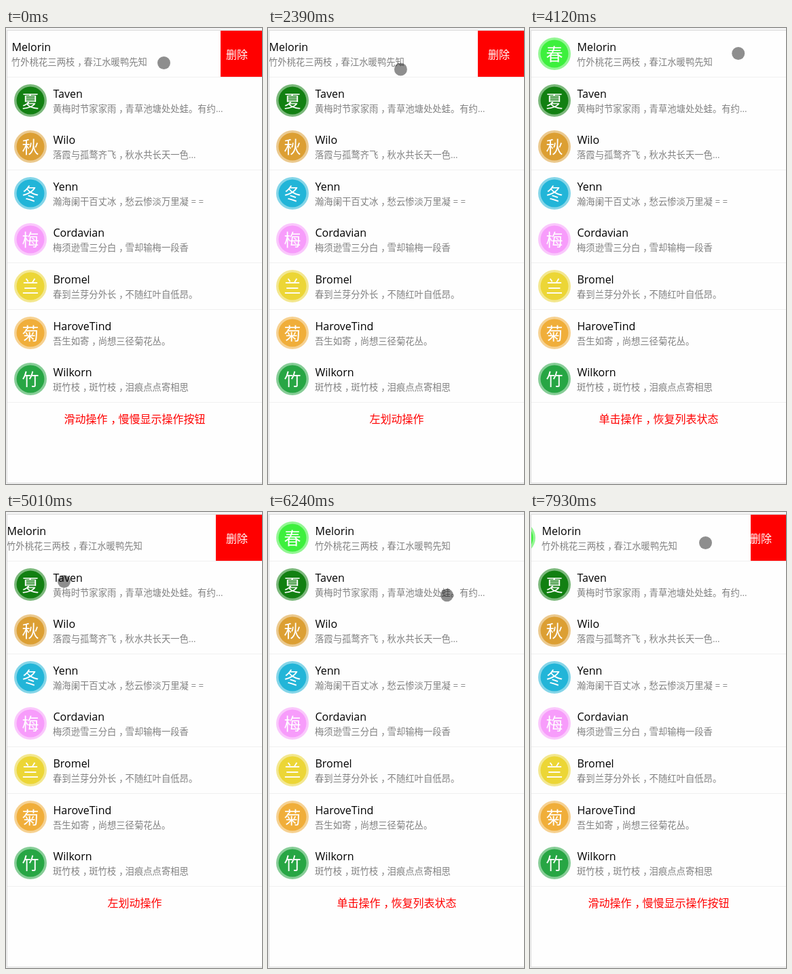
An HTML page with a canvas that plays this animation: 377 by 673 pixels, repeating every 8 s.

```html
<!DOCTYPE html>
<html lang="zh-CN">
<head>
<meta charset="utf-8">
<title>Swipe list</title>
<style>
html, body { margin: 0; height: 100%; overflow: hidden; background: #fff; }
canvas { display: block; width: 377px; height: 673px; }
</style>
</head>
<body>
<canvas id="stage" width="377" height="673"></canvas>
<script>
const ctx = document.getElementById('stage').getContext('2d');
const W = 377, H = 673, LOOP = 8000;
const TOP = 3.9, ROW = 68.57, OPEN = -68;
const FONT = '"Open Sans", "Noto Sans CJK SC", sans-serif';

const contacts = [
  ['春', '#3df03d', 'Melorin', '竹外桃花三两枝，春江水暖鸭先知'],
  ['夏', '#128012', 'Taven', '黄梅时节家家雨，青草池塘处处蛙。有约...'],
  ['秋', '#dc9f33', 'Wilo', '落霞与孤鹜齐飞，秋水共长天一色...'],
  ['冬', '#22b5d8', 'Yenn', '瀚海阑干百丈冰，愁云惨淡万里凝 = ='],
  ['梅', '#f79cfb', 'Cordavian', '梅须逊雪三分白，雪却输梅一段香'],
  ['兰', '#ecd636', 'Bromel', '春到兰芽分外长，不随红叶自低昂。'],
  ['菊', '#f0ae3a', 'HaroveTind', '吾生如寄，尚想三径菊花丛。'],
  ['竹', '#27a644', 'Wilkorn', '斑竹枝，斑竹枝，泪痕点点寄相思']
];

const DRAG = '滑动操作，慢慢显示操作按钮';
const SWIPE = '左划动操作';
const TAP = '单击操作，恢复列表状态';

// Each gesture runs in a few visible steps and ends with the pointer at x, y
// and the first row moved by shift; power bends its pace.
const gestures = [
  { start: 0, end: 0, steps: 1, x: 232, y: 51, shift: -61, label: DRAG },
  { start: 120, end: 810, steps: 6, x: 213, y: 50, shift: OPEN, label: DRAG },
  { start: 1240, end: 1510, steps: 3, x: 200, y: 50, shift: OPEN, label: SWIPE },
  { start: 2100, end: 2960, steps: 7, x: 135, y: 184, shift: OPEN, label: SWIPE, power: 3 },
  { start: 3390, end: 4390, steps: 8, x: 319, y: 26, shift: 0, label: TAP, power: 0.25 },
  { start: 4540, end: 4700, steps: 2, x: 150, y: 80, shift: OPEN, label: SWIPE },
  { start: 5010, end: 5010, steps: 1, x: 85, y: 102, shift: OPEN, label: SWIPE },
  { start: 5147, end: 5970, steps: 7, x: 220, y: 167, shift: 0, label: TAP },
  { start: 6090, end: 6920, steps: 7, x: 337, y: 45, shift: 0, label: TAP, power: 0.8 },
  { start: 7230, end: 7930, steps: 6, x: 258, y: 45, shift: -52, label: DRAG }
];

const mix = (a, b, p) => a + (b - a) * p;

function pose(time) {
  const i = gestures.findLastIndex(g => g.start <= time);
  const to = gestures[i], from = gestures.at(i - 1);
  const gap = (to.end - to.start) / (to.steps - 1) || 1;
  const step = Math.floor((time - to.start) / gap + 0.001) + 1;
  const p = Math.min(1, step / to.steps);
  const eased = p ** (to.power || 1);
  const slide = to.shift ? p : Math.min(1, 2 * p);
  return {
    x: mix(from.x, to.x, eased),
    y: mix(from.y, to.y, eased),
    shift: Math.round(mix(from.shift, to.shift, slide)),
    label: to.label
  };
}

// Full-width commas sit in the middle of their cell
function text(str, x, y, size, color, { align = 'left', weight = 400 } = {}) {
  ctx.font = `${weight} ${size}px ${FONT}`;
  ctx.fillStyle = color;
  if (align === 'center') x -= ctx.measureText(str).width / 2;
  for (const part of str.split(/(，)/)) {
    ctx.fillText(part, part === '，' ? x + size * 0.3 : x, y);
    x += ctx.measureText(part).width;
  }
}

function disc(x, y, r, color, alpha = 1) {
  ctx.globalAlpha = alpha;
  ctx.fillStyle = color;
  ctx.beginPath();
  ctx.arc(x, y, r, 0, Math.PI * 2);
  ctx.fill();
  ctx.globalAlpha = 1;
}

function box(x, y, w, h, color) {
  ctx.fillStyle = color;
  ctx.fillRect(x, y, w, h);
}

function clipped(x, y, w, h, paint) {
  ctx.save();
  ctx.beginPath();
  ctx.rect(x, y, w, h);
  ctx.clip();
  paint();
  ctx.restore();
}

function drawRow([mark, color, name, line], index, shift) {
  const y = Math.round(TOP + 34.2 + index * ROW);
  disc(36 + shift, y, 24, color, 0.55);
  disc(36 + shift, y, 20.5, color);
  text(mark, 36 + shift, y + 10, 25, '#fff', { align: 'center', weight: 500 });
  text(name, 69.5 + shift, y - 4, 16, '#000');
  text(line, 69 + shift, y + 17, 13.333, '#808080');

  // Hairlines that land near a whole pixel vanish
  const edge = TOP + (index + 1) * ROW;
  if (Math.abs(edge % 1 - 0.55) < 0.3) box(2, Math.floor(edge), W, 1, '#f0f0f0');
}

function draw(time) {
  const { x, y, shift, label } = pose(time);

  box(0, 0, W, H, '#f4f4f4');
  box(1, 3, W, 669, '#dcdcdc');
  box(2, 4, W, 667, '#fefefe');

  clipped(2, 4, W, 667, () => contacts.forEach((c, i) => drawRow(c, i, i ? 0 : shift)));
  clipped(W + shift, 4, -shift, 68, () => {
    box(W + shift, 4, -shift, 68, '#f00');
    text('删除', 324, 45, 16, '#fff');
  });

  text(label, 189.5, 583, 16, '#f00', { align: 'center' });
  disc(x + 0.5, y + 0.5, 9.5, '#000', 0.44);
}

function frame() {
  draw(performance.now() % LOOP);
  requestAnimationFrame(frame);
}
frame();
</script>
</body>
</html>
```
